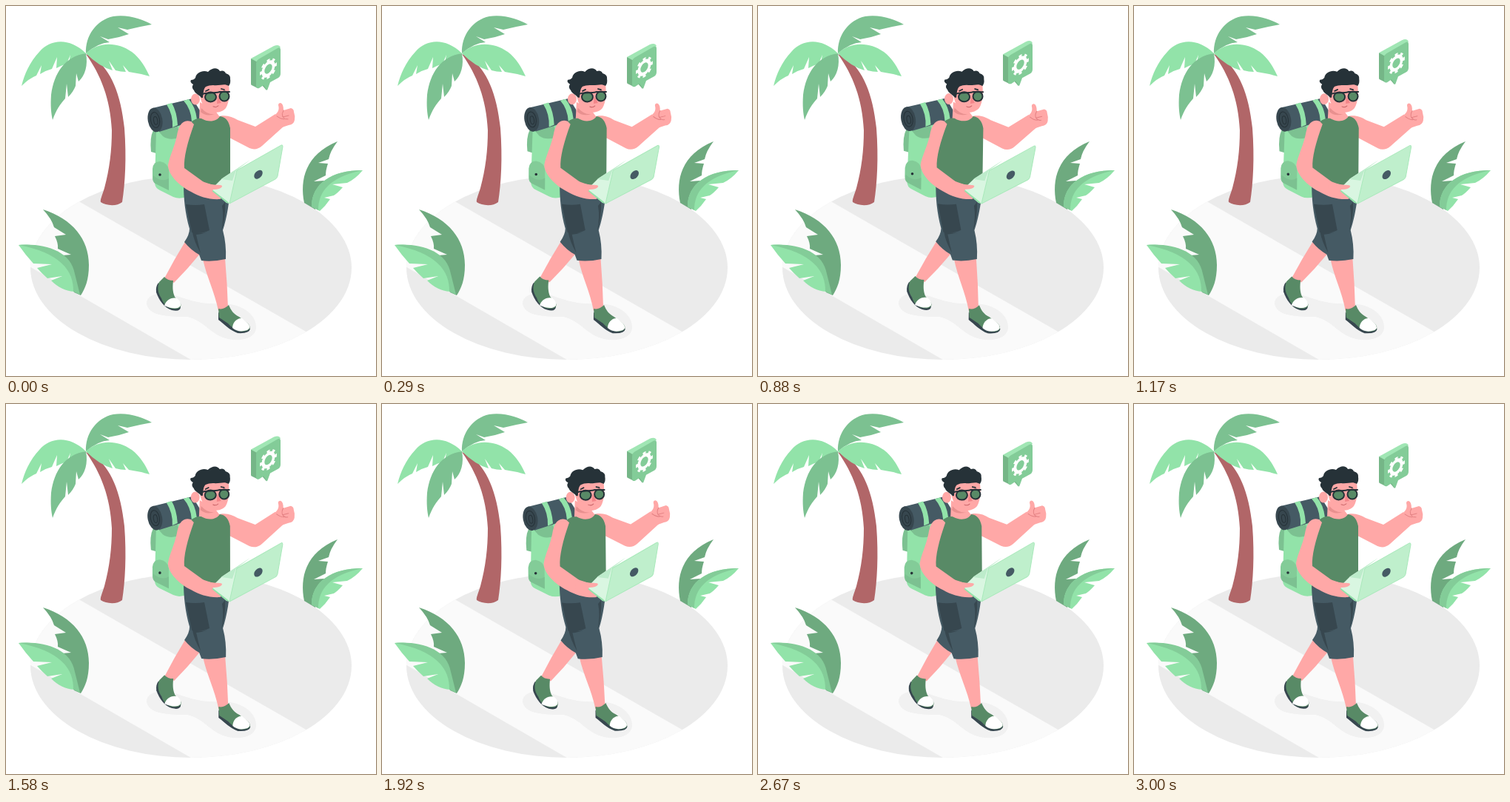
These frames come from a looping animation (500 by 500 pixels, 3040 ms). An HTML page:

```html
<!DOCTYPE html>
<html lang="en">
<head>
<meta charset="utf-8">
<title>Walking traveller</title>
<style>
html, body { margin: 0; width: 100%; height: 100%; overflow: hidden; background: #fff }
svg { display: block; width: 100vw; height: 100vh }
.bright { fill: #92e3a9 }
.soft { fill: #83cc98 }
.mid { fill: #7cc191 }
.deep { fill: #6eaa7f }
.shirt { fill: #588a66 }
.skin { fill: #ffa8a7 }
.dark { fill: #263238 }
.slate { fill: #455a64 }
.navy { fill: #37474f }
.white { fill: #fff }
.line { fill: none; stroke-linecap: round; stroke-linejoin: round }
</style>
</head>
<body>
<svg viewBox="0 0 500 500">
  <clipPath id="disc"><ellipse cx="250" cy="353.7" rx="217" ry="124.3"/></clipPath>

  <!-- ground -->
  <g clip-path="url(#disc)">
    <path fill="#ebebeb" d="M0,200H500V500H0Z"/>
    <path fill="#fafafa" d="M60,242 442,461 300,507 -20,322Z"/>
  </g>
  <path fill="#f1f1f1" d="M190,402C190,391 205,385 225,390C245,396 262,404 290,402C320,402 338,417 338,434C338,448 320,454 300,450C275,444 270,426 245,420C215,420 192,418 190,402Z"/>

  <!-- palm -->
  <path fill="#b16668" d="M108,65 119,69C142,88 155,118 160,165C163,205 161,240 157,265C150,271 135,270 128,265C127,262 130,256 133,246C140,220 143,195 143,168C141,125 128,93 108,65Z"/>
  <path class="mid" d="M108,64C107,40 122,19 145,14C165,11 185,18 197,25Q180,28 164,32L151,29 166,38Q152,43 138,45L127,41 140,49Q124,50 108,64Z"/>
  <path class="bright" d="M108,64C125,48 150,48 170,62C182,71 189,84 194,95Q180,91 166,89L158,80 162,89Q155,89 148,87L139,74 144,87Q126,82 108,64Z"/>
  <path class="bright" d="M108,64C85,42 60,45 45,62C32,76 25,92 21,108Q31,98 41,94L48,80 46,92Q54,87 62,85L69,69 68,84Q76,80 82,78L87,66 85,77Q94,68 108,64Z"/>
  <path class="mid" d="M108,64C80,68 65,90 61,120C60,135 61,145 63,154C68,140 73,133 80,125L82,105 84,123C89,118 92,113 94,108L95,91 98,102C107,94 111,80 108,64Z"/>

  <!-- bushes -->
  <path class="deep" d="M448,183Q438,196 436,207L422,212 435,213Q432,222 432,229L416,237 430,236 418,275 403,266C397,235 404,201 448,183Z"/>
  <path class="bright" d="M482,222Q472,234 461,239L441,241 455,245Q448,253 443,256L430,259 438,261Q432,270 424,277L413,271C413,240 440,222 482,222Z"/>
  <path class="soft" d="M482,222C440,222 413,240 413,271L422,276C422,250 438,231 482,222Z"/>
  <path class="deep" d="M50,275Q62,288 65,299L81,309 66,311Q71,321 70,328L88,336 76,337 92,387 101,391C107,382 112,370 112,350C112,315 90,288 50,275Z"/>
  <path class="bright" d="M17,323C50,320 85,335 92,362V386C80,385 70,380 61,371L76,365 56,368Q48,361 42,354L62,349 37,348Q26,336 17,323Z"/>
  <path class="soft" d="M17,323C50,320 88,330 93,362L100,390 91,386C92,357 72,333 17,323Z"/>

  <!-- speech bubble -->
  <g id="bubble">
    <path fill="#75b687" d="M331,71 340,73V111L332,107Q331,107 331,105ZM346,107 352,114 354,104Z"/>
    <path fill="#a0e6b4" d="M331,71 362,54Q369,51 371,56L340,76Z"/>
    <path class="soft" d="M338,77Q338,74 341,72L367,57Q371,55 371,59V91Q371,95 368,97L357,103 353,114 348,107 342,111Q338,112 338,108Z"/>
    <g fill="none" stroke="#fff" transform="matrix(.87 -.5 0 1 354.5 85)">
      <circle r="8.2" stroke-width="4.4"/>
      <circle r="11.4" stroke-width="3.4" pathLength="16" stroke-dasharray="1" stroke-dashoffset=".5"/>
    </g>
  </g>

  <g id="walker">
    <!-- backpack -->
    <path class="mid" d="M199,168Q194,178 196,197L203,199 206,168Z"/>
    <path class="bright" d="M203,168 242,158 246,257Q235,262 226,258L208,249Q201,246 201,238Z"/>
    <path class="mid" d="M205,168 231,160 236,177Q222,183 212,176Z"/>
    <path class="soft" d="M198,220Q199,210 208,210Q219,212 220,222V249L202,240Q198,238 198,232Z"/>
    <path class="mid" d="M199,229Q210,239 220,233V249L202,240Q198,238 199,229Z"/>
    <circle class="dark" cx="208" cy="228" r="1.8"/>

    <!-- bed roll -->
    <path class="slate" d="M198,138 252,125 268,151 207,170Z"/>
    <path class="bright" d="M217,133 224,131Q231,143 232,161L225,164Q226,147 217,133ZM240,128 247,126Q256,136 258,153L251,156Q250,139 240,128Z"/>
    <g transform="rotate(-10 201.5 154)">
      <ellipse class="navy" cx="201.5" cy="154" rx="9.8" ry="16.5"/>
      <ellipse class="line" stroke="#263238" cx="201.5" cy="154" rx="6" ry="10.5"/>
      <ellipse class="line" stroke="#263238" cx="202" cy="155" rx="2.6" ry="5.5"/>
    </g>

    <!-- raised arm -->
    <path class="skin" d="M284,150C296,146 305,149 313,154L337,163 364,146 376,162 346,189Q338,196 329,192L302,178Z"/>
    <path class="skin" d="M360,150C367,145 370,141 368,134Q368,131 371,131Q375,132 375,141L385,138Q389,139 389,143Q391,149 390,154Q389,160 382,161L373,164Z"/>
    <path class="line" stroke="#e38183" d="M375,141Q372,146 374,150L382,148M374,150Q377,154 381,153M366,149Q371,153 376,153"/>

    <!-- legs and shoes -->
    <path class="skin" d="M243,317Q227,343 214,368L227,374Q245,356 262,335Z"/>
    <path class="skin" d="M266,342 296,341Q299,375 300,408L287,412C282,386 271,366 266,342Z"/>
    <path class="navy" d="M206,374Q202,379 203,387C207,398 214,408 224,411Q236,414 236,406Z"/>
    <path class="shirt" d="M207,373 214,366Q218,371 226,371C225,379 225,386 228,393L236,402Q238,407 232,409C220,411 213,404 210,395C205,388 204,380 207,373Z"/>
    <path class="white" d="M214,405C216,398 223,393 231,395Q237,400 236,405Q231,412 214,405Z"/>
    <path class="navy" d="M287,414V424C295,430 302,438 313,442Q329,443 330,436Z"/>
    <path class="shirt" d="M287,409Q294,411 301,404C304,411 307,416 315,420L327,429Q333,436 325,439C312,442 306,435 300,429L288,421Z"/>
    <path class="white" d="M306,435C306,428 312,421 319,422L327,429Q332,435 326,438Q314,442 306,435Z"/>

    <!-- shorts -->
    <path class="slate" d="M240,240 303,238C303,262 298,288 293,303Q298,322 297,342Q279,346 264,344L261,336Q250,330 241,319Q248,309 248,301C242,280 240,260 240,240Z"/>
    <path class="navy" d="M243,268Q256,270 268,268L275,303Q263,309 251,306ZM252,306Q262,308 272,306Q261,309 257,309Q260,323 263,334Q254,318 252,306ZM296,265Q297,288 291,304Q295,285 292,270Z"/>

    <!-- neck, shirt -->
    <path class="skin" d="M262,130 283,142 289,150C284,158 270,159 261,153Z"/>
    <path fill="#e8908f" d="M264,138Q273,148 283,146Q270,150 263,143Z"/>
    <path class="shirt" d="M250,157Q257,151 264,152C274,158 285,156 289,149Q300,150 303,165V238Q290,256 240,246V215C240,190 243,170 250,157Z"/>

    <!-- head -->
    <path class="skin" d="M260,106 300,100C303,115 302,130 297,138C291,145 280,145 274,142C265,138 262,125 260,106Z"/>
    <ellipse class="skin" cx="256" cy="126" rx="6" ry="7.5"/>
    <path class="dark" d="M264,124C260,119 256,119 254,114Q250,110 253,106Q248,103 250,100Q254,100 256,97C257,90 266,86 273,89C279,83 286,83 289,88Q295,86 297,91Q304,93 303,99Q304,104 301,108C295,104 290,108 280,107Q274,107 270,109C266,113 267,119 266,124Z"/>
    <path class="line" stroke="#263238" stroke-width="1.8" d="M270,115 274,113M291,112 295,113"/>
    <path fill="#f28589" d="M286,122 291,131 285,132Z"/>
    <path class="line" stroke="#c86468" d="M280,136Q284,138 287,135"/>
    <g class="shirt" stroke="#263238" stroke-width="2">
      <ellipse cx="276.5" cy="123" rx="7.5" ry="6.5"/>
      <ellipse cx="295" cy="122" rx="6.5" ry="6.5"/>
      <path class="line" d="M262,120 269,118 283,117Q286,117 289,116L302,116"/>
    </g>

    <!-- near arm -->
    <path class="skin" d="M250,156C238,152 233,163 231,175C228,190 221,203 219,215C219,228 234,243 250,251C262,258 275,262 290,261L292,243 270,240 241,219C240,205 245,185 254,160Z"/>

    <!-- laptop -->
    <path fill="#d9f6e1" d="M277,248 292,233 330,208 312,222 303,267 298,266Z"/>
    <path fill="#bdeccb" d="M291,234 330,208 311,222 306,236Z"/>
    <path fill="#92e3a9" d="M277,247 299,264 302,267 298,266 277,249Z"/>
    <path fill="#bfefcc" stroke="#a9e9bb" stroke-linejoin="round" d="M312,222 372,188Q374,187 374,190L367,230Q366,233 364,234L302,267Z"/>
    <ellipse class="slate" cx="341" cy="227.7" rx="6.9" ry="4.6" transform="rotate(-48 341 227.7)"/>
    <path class="skin" d="M262,236 280,242Q293,241 292,244Q290,248 280,248L276,255 262,252Z"/>
  </g>
</svg>
<script>
const LOOP = 3040, CYCLE = 3000;
const walker = document.getElementById("walker");
const bubble = document.getElementById("bubble");

// Triangle wave: 0, 1, 0, -1, 0 over one cycle
const sway = p => p < .25 ? 4 * p : p < .75 ? 2 - 4 * p : 4 * p - 4;

function draw(now) {
  const p = Math.min(now % LOOP / CYCLE, 1);
  const lift = 10 * (1 - Math.abs(1 - 2 * p));
  walker.setAttribute("transform", `rotate(${sway(p)} 290.5 263)`);
  bubble.setAttribute("transform", `translate(0 ${-lift})`);
}

let start;
function tick(now) {
  start ??= now;
  draw(now - start);
  requestAnimationFrame(tick);
}
draw(0);
requestAnimationFrame(tick);
</script>
</body>
</html>
```
